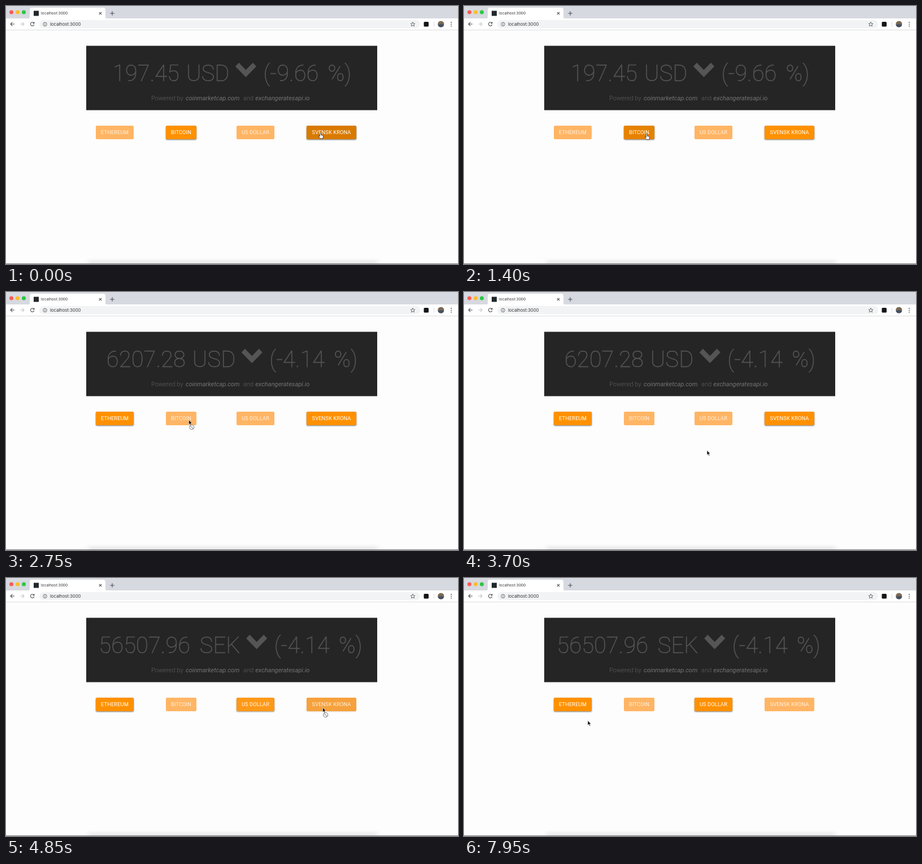
An HTML page that plays this animation: 800 px wide and 457 px high, repeating every 8000 ms.

```html
<!DOCTYPE html>
<html lang="en">
<head>
<meta charset="utf-8">
<title>localhost:3000</title>
<style>
  html, body { margin: 0; width: 100%; height: 100%; overflow: hidden; background: #fdfdfd; }
  svg { display: block; width: 100vw; height: 100vh; }
  .ui { font-family: Inter, Roboto, sans-serif; fill: #333; }
  .price { font: 100 40px Roboto, sans-serif; fill: #555; stroke: #555; stroke-width: .6; }
  .credit { font: 300 11.1px Roboto, sans-serif; fill: #606060; }
  .credit .link { font-style: italic; font-weight: 400; fill: #727272; }
  .label { font: 400 9.3px Roboto, sans-serif; letter-spacing: .1px; fill: #fff; text-anchor: middle; }
  .line { fill: none; stroke: #4a4d51; stroke-width: 1.1; }
  .end { text-anchor: end; }
</style>
</head>
<body>
<svg viewBox="0 0 800 457">
  <defs>
    <linearGradient id="dock" x2="0" y2="1">
      <stop stop-color="#000" stop-opacity="0"/>
      <stop offset="1" stop-color="#000" stop-opacity=".1"/>
    </linearGradient>
    <filter id="soft" x="-5%" y="-60%" width="110%" height="220%"><feGaussianBlur stdDeviation="4 1"/></filter>
    <filter id="shade" x="-10%" y="-20%" width="120%" height="150%"><feGaussianBlur stdDeviation=".9"/></filter>
  </defs>

  <!-- browser window -->
  <rect width="800" height="457" fill="#fdfdfd"/>
  <rect width="800" height="23" fill="#d6d9df"/>
  <path d="M38 23q4 0 4-4V7q0-4 4-4h126q4 0 4 4v12q0 4 4 4z" fill="#fff"/>
  <rect y="22" width="800" height="20" fill="#fff"/>
  <path d="M0 42.5H800" stroke="#dcdddf"/>
  <circle cx="9.5" cy="11" r="3.5" fill="#fc5b57"/>
  <circle cx="20.5" cy="11" r="3.5" fill="#fdbc2e"/>
  <circle cx="31.5" cy="11" r="3.5" fill="#2ac840"/>
  <rect x="49" y="8.5" width="9" height="9" fill="#20272b"/>
  <text class="ui" x="62" y="15.4" font-size="6.7">localhost:3000</text>
  <path class="line" d="M164.8 10.8l4.4 4.4m0-4.4l-4.4 4.4M184.2 13h7.6M188 9.2v7.6"/>
  <path class="line" d="M15 32H8m3.4-3.4L8 32l3.4 3.4"/>
  <path class="line" d="M25 32h7m-3.4-3.4L32 32l-3.4 3.4" style="stroke:#c3c5c8"/>
  <path class="line" d="M49.3 30.2A3.2 3.2 0 1 0 49.7 33M49.9 28.3v2.5h-2.6"/>
  <rect x="59" y="25" width="674" height="14.5" rx="7.2" fill="#f1f3f4"/>
  <circle class="line" cx="69" cy="32.3" r="3.3" style="stroke-width:.8"/>
  <path class="line" d="M69 31.8v2.3M69 30.2v.9" style="stroke-width:.9"/>
  <text class="ui" x="78" y="35" font-size="7.7">localhost:3000</text>
  <path class="line" d="M720 28.4l1.1 2.6 2.8.2-2.1 1.8.7 2.8-2.5-1.5-2.5 1.5.7-2.8-2.1-1.8 2.8-.2z" style="stroke-width:.8"/>
  <rect x="739.5" y="28" width="8.5" height="8.5" rx="1.5" fill="#151515"/>
  <path d="M757.5 28v9" stroke="#dadce0"/>
  <circle cx="769.8" cy="32" r="5.6" fill="#7a6a55"/>
  <path d="M764.4 33.5q5.4-3 10.8 0a5.6 5.6 0 0 1-10.8 0z" fill="#425066"/>
  <g fill="#4a4d51"><circle cx="788" cy="29" r=".9"/><circle cx="788" cy="32.3" r=".9"/><circle cx="788" cy="35.6" r=".9"/></g>
  <rect x="145" y="446" width="513" height="12" fill="url(#dock)" filter="url(#soft)"/>
  <path d="M0 456.5H800" stroke="#77797b"/>

  <!-- price panel -->
  <rect x="142" y="70.5" width="515" height="114" fill="#252525"/>
  <g id="quote" class="price">
    <text id="amount" class="end" x="-117.5" y="133"></text>
    <text id="unit" class="end" x="-29" y="133"></text>
    <path d="M-12.4 100.5L0 113.2 12.4 100.5 18.6 107 0 126-18.6 107z" stroke="none"/>
    <text id="change" x="31" y="133"></text>
    <text class="end" x="187" y="133">%)</text>
  </g>
  <g class="credit">
    <text x="257" y="167.3">Powered by</text>
    <text class="link" x="318" y="167.3">coinmarketcap.com</text>
    <text x="420" y="167.3">and</text>
    <text class="link" x="441.3" y="167.3">exchangeratesapi.io</text>
  </g>

  <g id="buttons"></g>

  <g id="cursor">
    <g id="arrow">
      <path d="M0 0V8.3L1.9 6.6 3.2 9.6 4.7 9 3.4 6.1H6z" fill="#111" stroke="#fff" stroke-width=".6"/>
      <g id="denied" fill="#fff" fill-opacity=".8" stroke="#888" stroke-width="1.1">
        <circle cx="5.2" cy="13" r="4"/><path d="M2.4 10.2l5.6 5.6"/>
      </g>
    </g>
    <path id="hand" d="M-1.2 .8Q0-.7 1 .8V4l3.3.8q1 .4.8 1.6L4.3 10.4H-.5L-3.3 6.6q-.2-1.2 1-1l1.1.9z" fill="#fff" stroke="#222" stroke-width=".8"/>
  </g>
</svg>
<script>
const LOOP = 8000, TOP = 212, HEIGHT = 24;
const COIN_CLICK = 1850, COIN_LOADED = 2250, CURRENCY_CLICK = 4720;
const $ = id => document.getElementById(id);
const clamp = v => Math.max(0, Math.min(1, v));
const fade = (t, start) => 1 - (1 - clamp((t - start) / 250)) ** 2;
const mix = (a, b, k) => a + (b - a) * k;

// on: enabled amount, hover: darkening amount
const buttons = [
  { name: 'ETHEREUM', x: 159, w: 67, on: t => fade(t, COIN_CLICK), hover: () => 0 },
  { name: 'BITCOIN', x: 283, w: 54, on: t => 1 - fade(t, COIN_CLICK),
    hover: t => fade(t, 1300) - fade(t, COIN_CLICK) },
  { name: 'US DOLLAR', x: 408, w: 67, on: t => fade(t, CURRENCY_CLICK), hover: () => 0 },
  { name: 'SVENSK KRONA', x: 532, w: 88, on: t => 1 - fade(t, CURRENCY_CLICK),
    hover: t => 1 - fade(t, 1040) + fade(t, 4450) - fade(t, CURRENCY_CLICK) }
];

$('buttons').innerHTML = buttons.map(({ name, x, w }) => {
  const box = `x="${x}" width="${w}" height="${HEIGHT}" rx="2"`;
  return `<g><rect ${box} y="${TOP + 1}" filter="url(#shade)"/><rect ${box} y="${TOP}"/>
    <text class="label" x="${x + w / 2}" y="${TOP + 15.4}">${name}</text></g>`;
}).join('');
buttons.forEach((b, i) => [b.shadow, b.face, b.text] = $('buttons').children[i].children);

const quotes = [
  { from: 0, x: 424.5, amount: '197.45', unit: 'USD', change: '(-9.66' },
  { from: COIN_LOADED, x: 435.3, amount: '6207.28', unit: 'USD', change: '(-4.14' },
  { from: CURRENCY_CLICK, x: 443.7, amount: '56507.96', unit: 'SEK', change: '(-4.14' }
];

// pointer stops: time, x, y
const path = [
  [0, 556.5, 224.5], [1000, 556.5, 224.5], [1350, 323.5, 226.3], [2720, 323, 226.3],
  [3450, 430, 278], [3700, 430, 280.5], [3780, 430, 280.5], [4420, 560, 240],
  [4550, 560.5, 229.5], [5150, 560.5, 229.5], [5500, 559.5, 253.5], [6950, 559.5, 253.5],
  [7400, 390, 305], [7750, 238, 292], [7950, 219, 252.5], [LOOP, 219, 252.5]
];

function pointerAt(t) {
  const i = path.findIndex(p => p[0] > t);
  const [t0, x0, y0] = path[i - 1], [t1, x1, y1] = path[i];
  const k = (t - t0) / (t1 - t0), s = k * k * (3 - 2 * k);
  return [mix(x0, x1, s), mix(y0, y1, s)];
}

function draw(t) {
  const quote = quotes.findLast(q => t >= q.from);
  $('quote').setAttribute('transform', `translate(${quote.x})`);
  for (const id of ['amount', 'unit', 'change']) $(id).textContent = quote[id];

  for (const b of buttons) {
    const on = b.on(t), h = b.hover(t);
    const color = [mix(255, 217, h), mix(mix(181, 145, on), 122, h), mix(mix(100, 0, on), 0, h)];
    b.face.setAttribute('fill', `rgb(${color})`);
    b.shadow.setAttribute('opacity', on * .55);
    b.text.setAttribute('opacity', mix(.8, 1, on));
  }

  const [x, y] = pointerAt(t);
  const over = buttons.find(b => x >= b.x && x <= b.x + b.w && y >= TOP && y <= TOP + HEIGHT);
  const active = over && over.on(t) > .99;
  $('cursor').setAttribute('transform', `translate(${x} ${y})`);
  $('hand').style.display = active ? '' : 'none';
  $('arrow').style.display = active ? 'none' : '';
  $('denied').style.display = over ? '' : 'none';
}

const begin = performance.now();
function tick() {
  draw((performance.now() - begin) % LOOP);
  requestAnimationFrame(tick);
}
tick();
</script>
</body>
</html>
```
